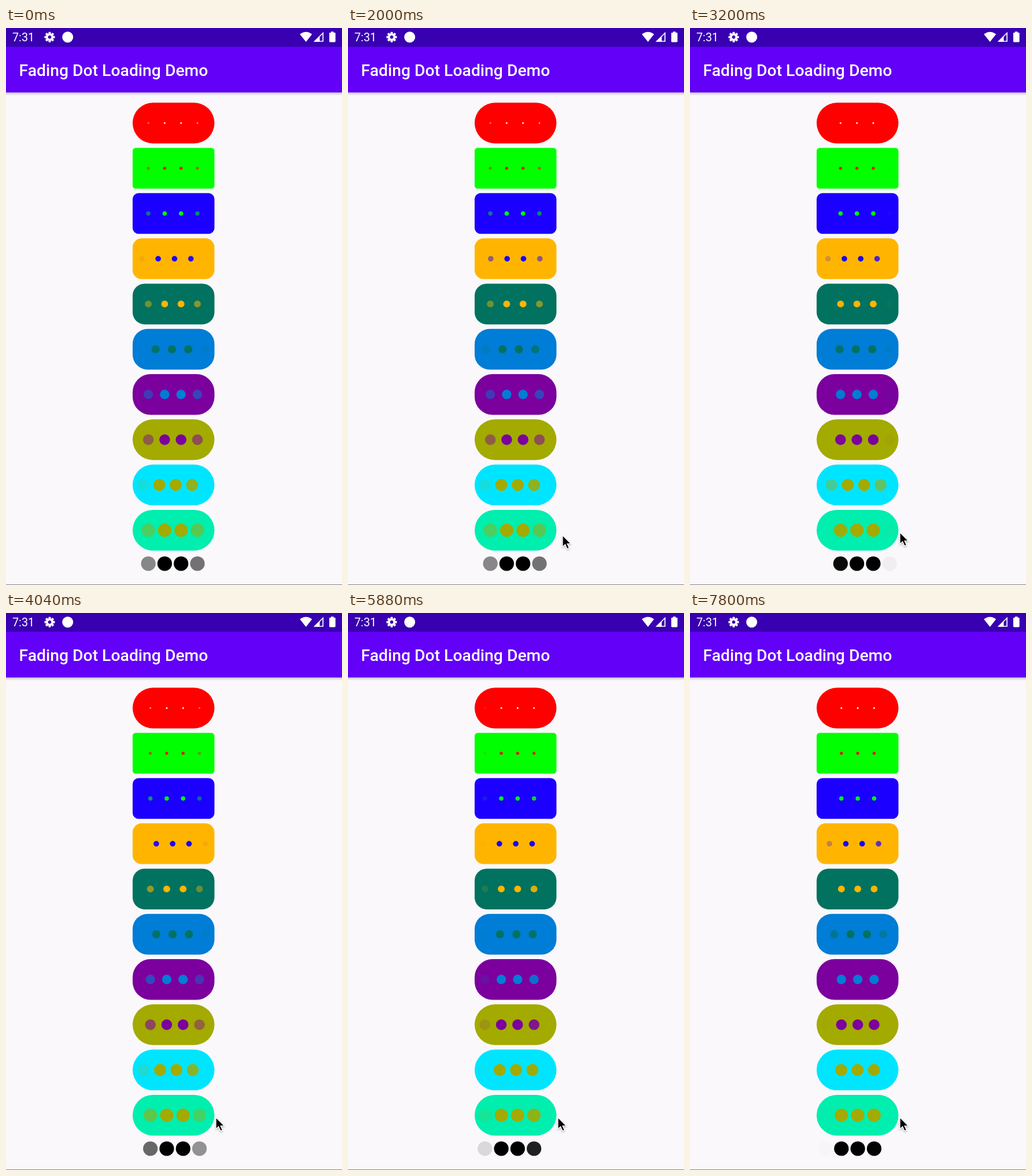
Write an HTML page that moves like this. It is 581 px wide and 964 px high and loops after 7.84 s.

```html
<!DOCTYPE html>
<html lang="en">
<head>
<meta charset="utf-8">
<title>Fading Dot Loading Demo</title>
<style>
  html, body { margin: 0; width: 100%; height: 100%; overflow: hidden; background: #faf8fb; }
  svg { display: block; width: 100%; height: 100%; }
  text { font-family: Roboto, "Open Sans", sans-serif; fill: #fff; }
</style>
</head>
<body>
<svg viewBox="0 0 581 964">
  <defs>
    <linearGradient id="shade" x1="0" y1="0" x2="0" y2="1">
      <stop offset="0" stop-color="#000" stop-opacity=".22"/>
      <stop offset="1" stop-color="#000" stop-opacity="0"/>
    </linearGradient>
    <filter id="soft" x="-50%" y="-50%" width="200%" height="200%">
      <feDropShadow dx="0" dy="1.5" stdDeviation="1.5" flood-opacity=".35"/>
    </filter>
  </defs>
  <rect width="581" height="964" fill="#faf8fb"/>
  <rect y="111" width="581" height="6" fill="url(#shade)"/>
  <rect width="581" height="111.5" fill="#6300f7"/>
  <rect width="581" height="32.5" fill="#3800b1"/>
  <text x="11" y="23.3" font-size="19.8">7:31</text>
  <text x="22.6" y="83" font-size="28.3" font-weight="500">Fading Dot Loading Demo</text>
  <g fill="#fff">
    <g id="gear" transform="translate(75.5 15.7)">
      <circle r="4.7" fill="none" stroke="#fff" stroke-width="3.6"/>
    </g>
    <circle cx="106.7" cy="15.7" r="9.5"/>
    <path d="M518.7 24 L508.2 10.7 Q518.7 2.6 529.2 10.7 Z"/>
    <path d="M533.8 23 L548.1 8.7 V23 Z" fill="none" stroke="#fff" stroke-width="1.7"/>
    <path d="M532.5 23.8 L542.5 13.8 V23.8 Z"/>
    <path d="M562 8 V6.2 H566.5 V8 H568.4 Q569.7 8 569.7 9.3 V23 Q569.7 24.4 568.4 24.4 H560.3 Q559 24.4 559 23 V9.3 Q559 8 560.3 8 Z"/>
  </g>
  <g id="rows"></g>
  <rect y="963" width="581" height="1" fill="#858387"/>
  <path id="cursor" filter="url(#soft)" d="M0 0 V20 L4.6 15.8 L8 23.4 L11.4 21.9 L8.1 14.5 H14.4 Z"
        fill="#000" stroke="#fff" stroke-width="1.2"/>
</svg>
<script>
const LOOP = 7840, CENTER = 289.7, SPACING = 28.3, HEAD_START = 236;
const PILL = { width: 141.5, height: 70.5, top: 129.2, pitch: 78.3 };

// pill colour, dot colour, cycle in ms
const rows = [
  ['#ff0000', '#ffffff', 500],
  ['#00ff00', '#ff0000', 500],
  ['#1b00ff', '#00ff00', 500],
  ['#ffb500', '#1b00ff', 1500],
  ['#00725f', '#ffb500', 500],
  ['#007dd6', '#00725f', 800],
  ['#7b009d', '#007dd6', 500],
  ['#a3aa00', '#7b009d', 500],
  ['#00e5ff', '#a3aa00', 1000],
  ['#00eeae', '#a3aa00', 500],
  [null, '#000000', 500]
];

const byId = id => document.getElementById(id);

function add(parent, tag, attrs) {
  const node = document.createElementNS('http://www.w3.org/2000/svg', tag);
  for (const key in attrs) node.setAttribute(key, attrs[key]);
  return parent.appendChild(node);
}

for (let i = 0; i < 8; i++) {
  add(byId('gear'), 'rect', { x: -2, y: -9, width: 4, height: 4, rx: .8, transform: `rotate(${i * 45})` });
}

const loaders = rows.map(([pill, color, cycle], i) => {
  const top = PILL.top + i * PILL.pitch;
  if (pill) {
    add(byId('rows'), 'rect', {
      x: CENTER - PILL.width / 2, y: top, width: PILL.width, height: PILL.height,
      rx: i ? Math.min(5.2 * i, PILL.height / 2) : PILL.height / 2, fill: pill
    });
  }
  const cy = pill ? top + PILL.height / 2 : 927;
  const dots = [0, 1, 2, 3].map(() => add(byId('rows'), 'circle', { cy, r: 1.5 + 1.11 * i, fill: color }));
  return { dots, cycle };
});

const ease = p => (1 - Math.cos(Math.PI * p)) / 2;
const clamp = v => Math.min(1, Math.max(0, v));

function drawLoader({ dots, cycle }, time) {
  // Each loader keeps its own cycle, counted from a shared start.
  const elapsed = time + HEAD_START + (cycle === 800 ? 400 : 0);
  const shift = ease(elapsed % cycle / cycle);
  dots.forEach((dot, i) => {
    dot.setAttribute('cx', CENTER + (i - 2 + shift) * SPACING);
    dot.setAttribute('opacity', i === 0 ? shift : i === 3 ? 1 - shift : 1);
  });
}

function drawCursor(time) {
  const enter = ease(clamp((time - 1760) / 240));
  const settle = ease(clamp((time - 2000) / 200));
  const x = 390 - 19 * enter - 8 * settle;
  const y = 966 - 88 * enter - 5 * settle;
  byId('cursor').setAttribute('transform', `translate(${x} ${y})`);
  byId('cursor').setAttribute('visibility', time < 1760 ? 'hidden' : 'visible');
}

function draw(time) {
  loaders.forEach(loader => drawLoader(loader, time));
  drawCursor(time);
}

const start = performance.now();
function tick() {
  draw((performance.now() - start) % LOOP);
  requestAnimationFrame(tick);
}
tick();
</script>
</body>
</html>
```
